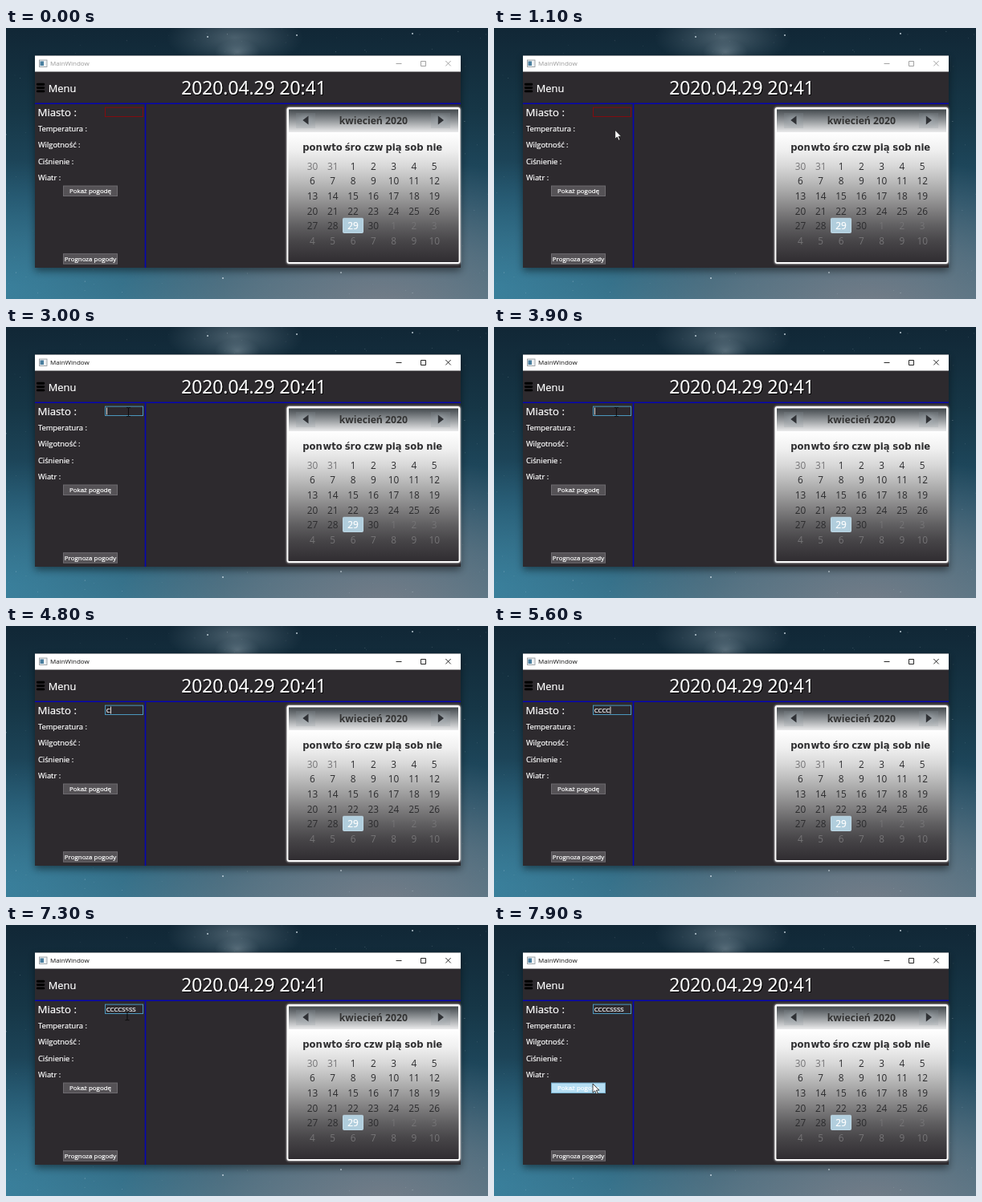
Recreate the animation shown at these times as an HTML page. Size 600x338 px, loop 8 s.

```html
<!DOCTYPE html>
<html lang="pl">
<head>
<meta charset="utf-8">
<title>MainWindow</title>
<style>
  html, body { margin: 0; width: 100%; height: 100%; overflow: hidden; background: #1b3448; }
  svg { display: block; width: 600px; height: 338px; }
  text { font-family: "Open Sans", "Noto Sans", sans-serif; white-space: pre; }
  .white { fill: #fff; }
  .crisp { stroke: #fff; stroke-width: .22px; }
  .bold { font-weight: 700; }
  .mid { text-anchor: middle; }
  .weekday { font-family: "DejaVu Sans", sans-serif; font-weight: 700; }
</style>
</head>
<body>
<svg id="stage" viewBox="0 0 600 338">
  <defs>
    <linearGradient id="sky" x1="0" y1="0" x2="0" y2="1">
      <stop offset="0" stop-color="#112736"/>
      <stop offset=".3" stop-color="#163646"/>
      <stop offset=".65" stop-color="#225067"/>
      <stop offset="1" stop-color="#386b81"/>
    </linearGradient>
    <radialGradient id="haze">
      <stop offset="0" stop-color="#7f8089" stop-opacity=".85"/>
      <stop offset=".5" stop-color="#7a7f89" stop-opacity=".5"/>
      <stop offset="1" stop-color="#7a7f89" stop-opacity="0"/>
    </radialGradient>
    <radialGradient id="teal">
      <stop offset="0" stop-color="#3b87a5" stop-opacity=".75"/>
      <stop offset="1" stop-color="#3b87a5" stop-opacity="0"/>
    </radialGradient>
    <radialGradient id="cloud">
      <stop offset="0" stop-color="#8497a2" stop-opacity=".5"/>
      <stop offset="1" stop-color="#6d8290" stop-opacity="0"/>
    </radialGradient>
    <linearGradient id="month" x1="0" y1="0" x2="0" y2="1">
      <stop offset="0" stop-color="#43494d"/>
      <stop offset=".5" stop-color="#94989b"/>
      <stop offset="1" stop-color="#ebebec"/>
    </linearGradient>
    <linearGradient id="days" x1="0" y1="0" x2="0" y2="1">
      <stop offset=".16" stop-color="#fff"/>
      <stop offset=".27" stop-color="#f0f0f0"/>
      <stop offset=".375" stop-color="#d8d8d8"/>
      <stop offset=".52" stop-color="#adadad"/>
      <stop offset=".66" stop-color="#807f80"/>
      <stop offset=".76" stop-color="#605f61"/>
      <stop offset=".86" stop-color="#474548"/>
      <stop offset="1" stop-color="#2f2c30"/>
    </linearGradient>
    <radialGradient id="nav">
      <stop offset="0" stop-color="#a9b1b7" stop-opacity=".6"/>
      <stop offset="1" stop-color="#8b959c" stop-opacity=".2"/>
    </radialGradient>
    <filter id="soft" x="-10%" y="-10%" width="120%" height="120%"><feGaussianBlur stdDeviation="1.2"/></filter>
    <filter id="shade" x="-10%" y="-10%" width="120%" height="130%"><feGaussianBlur stdDeviation="5"/></filter>
  </defs>

  <rect width="600" height="338" fill="url(#sky)"/>
  <ellipse cx="0" cy="325" rx="270" ry="160" fill="url(#teal)"/>
  <ellipse cx="470" cy="350" rx="330" ry="190" fill="url(#haze)"/>
  <ellipse cx="285" cy="12" rx="85" ry="36" fill="url(#cloud)"/>
  <ellipse cx="288" cy="30" rx="28" ry="16" fill="url(#cloud)"/>
  <g id="stars" fill="#d5e3ea"></g>

  <rect x="36" y="38" width="530" height="265" opacity=".45" filter="url(#shade)"/>
  <rect x="36" y="34.5" width="530" height="264.5" fill="#2d2a2e"/>
  <rect x="36" y="34.5" width="530" height="20" fill="#fff"/>
  <rect x="41.5" y="40" width="9.5" height="8.5" fill="#eef1f3" stroke="#8b9296" stroke-width=".8"/>
  <rect x="42.5" y="41.5" width="4.5" height="5.5" fill="#4a7f9f"/>
  <g id="caption">
    <text x="55" y="47.3" font-size="8">MainWindow</text>
    <path d="M485.5 44.5h7M516.5 41.5h6v6h-6zM547.3 41l6.4 6.4m0-6.4l-6.4 6.4" fill="none" stroke-width=".9"/>
  </g>

  <path d="M39.3 70.3h7.6M39.3 74.6h7.6M39.3 78.9h7.6" stroke="#000" stroke-width="2.9" stroke-linecap="round"/>
  <g id="labels"></g>
  <path d="M36 94.3H566M173.5 94.3V299" stroke="#0505b4" stroke-width="1.6"/>

  <rect id="field" x="123.5" y="99.1" width="47" height="11.4" fill="none"/>
  <text id="city" class="white crisp" x="124.8" y="107.8" font-size="7.9"></text>
  <rect id="caret" y="100.5" width="1" height="9" fill="#ddd"/>
  <g id="buttons"></g>

  <rect x="350.5" y="100" width="214" height="193" rx="2" fill="none" stroke="#fff" stroke-width="3" opacity=".7" filter="url(#soft)"/>
  <rect x="350.5" y="100" width="214" height="193" rx="2" fill="url(#days)" stroke="#fff" stroke-width="1.8"/>
  <rect x="352" y="101.5" width="211" height="28.5" fill="url(#month)"/>
  <rect x="352" y="130" width="211" height="2" fill="#fff"/>
  <rect x="361" y="106" width="24" height="19" fill="url(#nav)"/>
  <rect x="529" y="106" width="24" height="19" fill="url(#nav)"/>
  <path d="M376.5 109.5v11l-7.2-5.5zM537.8 109.5v11l7.2-5.5z" fill="#303236"/>
  <text class="bold mid" x="457.3" y="120.3" font-size="12.2" fill="#333">kwiecień 2020</text>
  <g id="grid"></g>

  <path id="beam" d="M-2.5 -5.5h2l.5 .5l.5 -.5h2M0 -5v10M-2.5 5.5h2l.5 -.5l.5 .5h2" fill="none" stroke="#080808" stroke-width=".9"/>
  <path id="arrow" d="M0 0v11.2l2.6-2.4l1.9 4.2l1.8-.8l-1.9-4.1h3.5z" fill="#fff" stroke="#111" stroke-width=".8"/>
</svg>
<script>
const LOOP = 8000, BLINK = 530;
const ACTIVATE = 1400, CLICK = 1740;
const KEYS = [4450, 4900, 5150, 5400, 5650, 5870, 6080, 6280];
const TYPED = 'CCCCSSSS';
// Pointer path: time, x, y
const PATH = [
  [800, 148, 170], [1250, 152, 106], [2300, 152, 106], [2500, 152.5, 106],
  [7000, 152, 106], [7300, 151, 113], [7500, 141, 145], [7800, 123, 198], [8000, 123, 198]
];

const byId = id => document.getElementById(id);
function add(parent, tag, attrs, text = '') {
  const el = document.createElementNS('http://www.w3.org/2000/svg', tag);
  for (const key in attrs) el.setAttribute(key, attrs[key]);
  el.textContent = text;
  return byId(parent).appendChild(el);
}
function set(id, attrs) {
  for (const key in attrs) byId(id).setAttribute(key, attrs[key]);
}

function drawStars() {
  let seed = 41;
  const random = () => (seed = seed * 16807 % 2147483647) / 2147483647;
  for (let i = 0; i < 200; i++) {
    add('stars', 'circle', {
      cx: random() * 600, cy: random() * 338,
      r: .25 + random() * .35, opacity: .12 + random() * .4
    });
  }
  for (const [cx, cy] of [[251, 11], [362, 9], [270, 312], [417, 305], [506, 7]]) {
    add('stars', 'circle', { cx, cy, r: 1, opacity: .85 });
  }
}

function drawLabels() {
  const label = (x, y, size, text) =>
    add('labels', 'text', { x, y, 'font-size': size, class: 'white crisp' }, text);
  label(52.8, 79.6, 12.8, 'Menu');
  add('labels', 'text', { x: 219.3, y: 84, 'font-size': 22.8 }, '2020.04.29 20:41');
  label(218.2, 82.8, 22.8, '2020.04.29 20:41');
  label(39.5, 110, 13.2, 'Miasto :');
  ['Temperatura :', 'Wilgotność :', 'Ciśnienie :', 'Wiatr :'].forEach((text, i) =>
    label(39.9, 129 + i * 20.3, 9.35, text));
}

function drawButton(y, text) {
  const box = add('buttons', 'rect', {
    x: 71.5, y, width: 67, height: 12.5, fill: '#555256', stroke: '#6d6a6f'
  });
  add('buttons', 'text', { x: 105, y: y + 9.2, 'font-size': 7.95, class: 'white crisp mid' }, text);
  return box;
}

function drawCalendar() {
  const column = i => 381.4 + i * 25.3;
  ['pon', 'wto', 'śro', 'czw', 'pią', 'sob', 'nie'].forEach((text, i) =>
    add('grid', 'text', { x: column(i), y: 152.6, 'font-size': 11.6, class: 'weekday mid', fill: '#2d2d2f' }, text));
  add('grid', 'rect', { x: 419.5, y: 237.3, width: 25, height: 18.2, rx: 1, fill: '#b1cedd', stroke: '#bdd7e4' });
  for (let i = 0; i < 42; i++) {
    const day = i < 2 ? 30 + i : (i - 2) % 30 + 1;
    const selected = i === 30, outside = i < 2 || i > 31;
    add('grid', 'text', {
      x: column(i % 7), y: 176.6 + Math.floor(i / 7) * 18.7, 'font-size': 11.8,
      class: selected ? 'mid white crisp' : 'mid',
      fill: outside ? '#757476' : '#2c2c2e'
    }, day);
  }
}

function pointerAt(t) {
  const next = PATH.findIndex(step => step[0] > t);
  if (next < 1) return PATH[0].slice(1);
  const [t0, x0, y0] = PATH[next - 1], [t1, x1, y1] = PATH[next];
  const p = (t - t0) / (t1 - t0);
  return [x0 + (x1 - x0) * p, y0 + (y1 - y0) * p];
}

function render(t) {
  const active = t >= ACTIVATE;
  const ink = active ? '#111' : '#999';
  set('caption', { fill: ink });
  byId('caption').lastElementChild.setAttribute('stroke', ink);
  set('field', { stroke: active ? '#4c97bd' : '#820b10' });

  const count = KEYS.filter(time => time <= t).length;
  const city = byId('city');
  city.textContent = TYPED.slice(0, count);
  const blinkStart = count ? KEYS[count - 1] : CLICK;
  const caretOn = t >= CLICK && Math.floor((t - blinkStart) / BLINK) % 2 === 0;
  set('caret', {
    x: 125 + (count ? city.getComputedTextLength() : 0),
    visibility: caretOn ? 'visible' : 'hidden'
  });

  const [x, y] = pointerAt(t);
  const shown = t >= PATH[0][0] && (t < KEYS[0] || t >= 7000);
  const overField = y <= 113.5;
  const show = (id, on) => set(id, {
    transform: `translate(${x} ${y})`, visibility: on ? 'visible' : 'hidden'
  });
  show('beam', shown && overField);
  show('arrow', shown && !overField);

  const hover = t > 7000 && y >= 197;
  weather.setAttribute('fill', hover ? '#b5def3' : '#555256');
  weather.setAttribute('stroke', hover ? '#76aecb' : '#6d6a6f');
}

drawStars();
drawLabels();
const weather = drawButton(197, 'Pokaż pogodę');
drawButton(281.7, 'Prognoza pogody');
drawCalendar();

const start = performance.now();
function tick() {
  render((performance.now() - start) % LOOP);
  requestAnimationFrame(tick);
}
tick();
</script>
</body>
</html>
```
